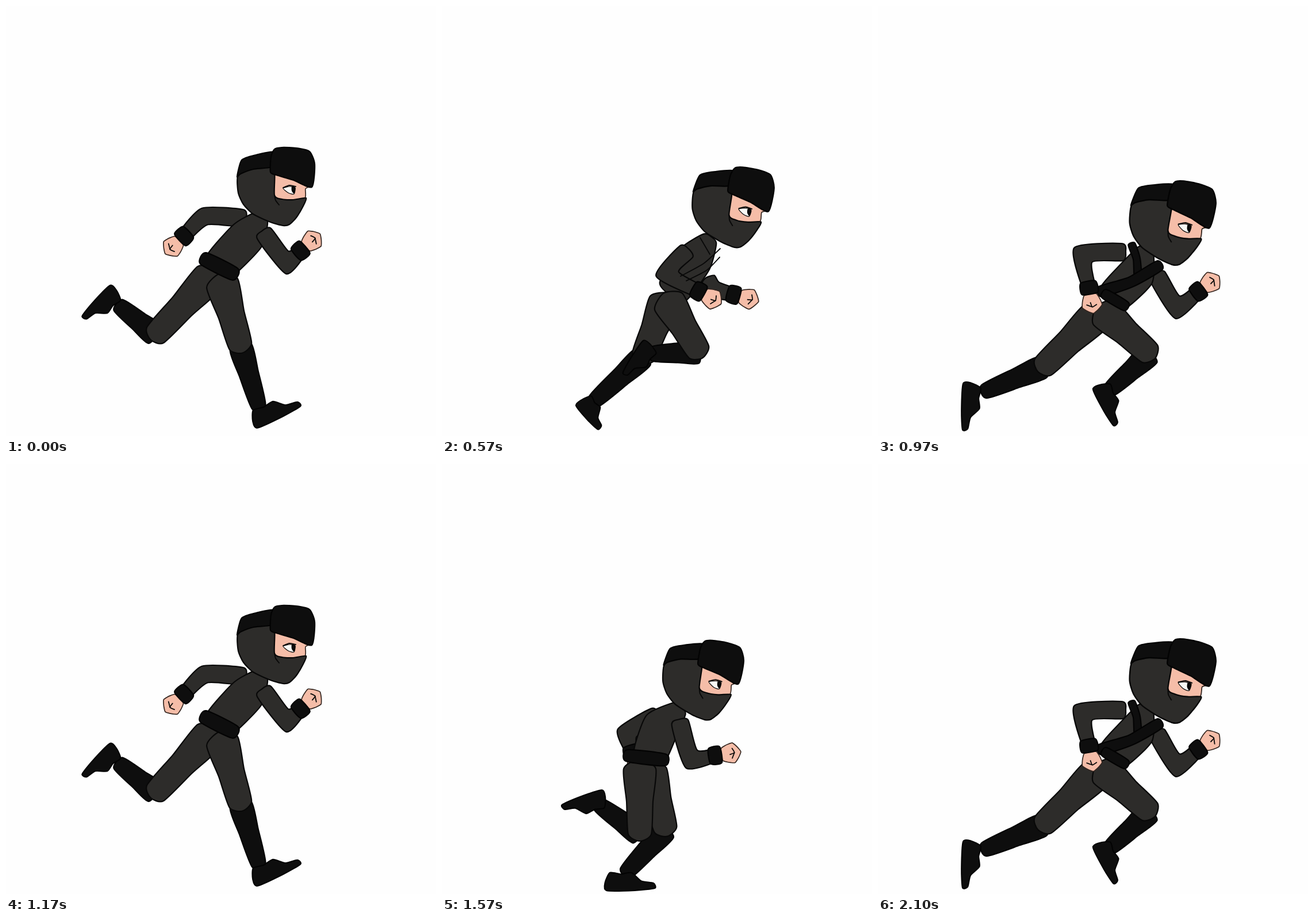
An HTML page that plays this animation: 748x748 px, repeating every 2260 ms.

```html
<!DOCTYPE html>
<html>
<head>
<meta charset="utf-8">
<title>Running ninja</title>
<style>
html, body { margin: 0; height: 100%; overflow: hidden; background: #fefefe; }
svg { display: block; width: 100%; height: 100%; }
path { stroke: #080808; stroke-width: 2.2; stroke-linejoin: round; stroke-linecap: round; }
.suit { fill: #2d2c2a; }
.black { fill: #0e0e0e; stroke: #030303; }
.skin { fill: #f5bda8; stroke: #33251f; stroke-width: 1.7; }
.eye { fill: #fafaf6; stroke-width: 1.2; }
.line { fill: none; stroke-width: 1.8; }
</style>
</head>
<body>
<svg viewBox="0 0 748 748"></svg>
<script>
const { PI, cos, sin, max, atan2, hypot } = Math;
const angle = (a, b) => atan2(b[1] - a[1], b[0] - a[0]);
const step = ([x, y], a, d) => [x + d * cos(a), y + d * sin(a)];
const mix = (a, b, t) => a.map((v, i) => v + (b[i] - v) * t);

// Softly rounded curve through points.
function shape(name, p) {
  const n = p.length, open = name == 'line';
  const at = i => p[open ? max(0, Math.min(n - 1, i)) : (i + n) % n];
  let d = 'M' + p[0];
  for (let i = 0; i < n - open; i++) {
    const [a, b, c, e] = [at(i - 1), at(i), at(i + 1), at(i + 2)];
    const c1 = b.map((v, k) => v + (c[k] - a[k]) / 9);
    const c2 = c.map((v, k) => v - (e[k] - b[k]) / 9);
    d += `C${c1} ${c2} ${c}`;
  }
  return `<path class="${name}" d="${d}${open ? '' : 'Z'}"/>`;
}
const draw = (name, text) => shape(name, text.split(' ').map(s => s.split(',').map(Number)));

// Tube along joints with a half-width at each; cap rounds both ends.
function limb(name, joints, widths, cap = 0) {
  const last = joints.length - 1;
  const dirs = joints.slice(1).map((p, i) => angle(joints[i], p));
  const side = s => joints.map((p, i) => {
    const a = dirs[max(0, i - 1)], b = dirs[Math.min(i, last - 1)];
    const half = atan2(sin(b - a), cos(b - a)) / 2;
    const w = widths[i] ?? widths[0];
    return step(p, a + half + s * PI / 2, w / max(.7, cos(half)));
  });
  const tip = step(joints[last], dirs[last - 1], cap * (widths[last] ?? widths[0]));
  const tail = step(joints[0], dirs[0], -cap * widths[0]);
  return shape(name, [...side(-1), ...(cap ? [tip] : []), ...side(1).reverse(), ...(cap ? [tail] : [])]);
}

const group = (x, y, turn, scale, art) =>
  `<g transform="translate(${x} ${y}) rotate(${turn}) scale(${scale})">${art}</g>`;

const knuckles = Array.from({ length: 15 }, (_, i) => {
  const a = i / 15 * 2 * PI;
  return step([0, 0], a, 17 + 1.3 * cos(5 * a));
});
const handArt = shape('skin', knuckles) + draw('line', '4,-8 7,0 -1,2') + draw('line', '7,0 2,9');
const shoeArt = draw('black', '0,0 -2,-14 7,-31 26,-28 45,-30 62,-15 83,-11 85,-2 50,1');
const headArt =
  draw('skin', '-1,-12 33,0 63,12 54,18 52,35 13,38 0,31') +
  draw('suit', '-64,-3 -63,25 -54,45 -37,62 -7,76 15,82 26,80 38,68 50,48 55,34 33,37 13,36 0,29 -2,-22 -47,-20') +
  draw('line', '0,29 2,38 8,46') +
  draw('black', '-65,-3 -57,-32 -32,-41 -1,-46 -2,-21 -37,-16 -59,-8') +
  draw('black', '0,-51 13,-54 38,-53 61,-47 70,-25 65,15 33,3 3,-6 -7,-11 -6,-38') +
  draw('eye', '15,17 27,14 36,16 34,27 24,25') +
  draw('black', '31,15 35,16 34,25 31,21') +
  draw('line', '15,16 26,12 37,14');

const sleeve = joints => limb('suit', joints, [15, 14, 11], .4);
function fist([, elbow, wrist]) {
  const a = angle(elbow, wrist);
  const [x, y] = step(wrist, a, 27);
  return group(x, y, a * 180 / PI, 1, handArt) +
    limb('black', [step(wrist, a, -10), step(wrist, a, 10)], [13, 14]);
}
function leg([hip, knee, ankle, heel, toe]) {
  const size = hypot(toe[0] - heel[0], toe[1] - heel[1]) / 85;
  return limb('black', [knee, mix(knee, ankle, .45), ankle], [19, 17, 12]) +
    group(...heel, angle(heel, toe) * 180 / PI, `${size} 1`, shoeArt) +
    limb('suit', [hip, mix(hip, knee, .5), knee], [28, 23, 20], .6);
}
const band = (width, ...joints) => limb('black', joints, [width]);

const pose = ({ head: [x, y, turn, scale], torso, farArm, nearArm, farLeg, nearLeg, trim }) => [
  sleeve(farArm), fist(farArm), leg(farLeg),
  limb('suit', torso, [14, 31, 28], .3),
  leg(nearLeg), sleeve(nearArm), trim, fist(nearArm),
  group(x, y, turn, scale, headArt)
].join('');

const stride = pose({
  head: [467, 300, 0, 1],
  torso: [[444, 368], [420, 400], [370, 453]],
  farArm: [[412, 369], [346, 366], [310, 400]],
  nearArm: [[449, 396], [489, 446], [512, 426]],
  farLeg: [[354, 472], [260, 572], [195, 520], [181, 486], [131, 538]],
  nearLeg: [[376, 482], [408, 592], [440, 698], [437, 734], [513, 698]],
  trim: band(11, [343, 439], [399, 467])
});

const landing = pose({
  head: [459, 342, 4, 1],
  torso: [[432, 398], [410, 430], [365, 475]],
  farArm: [[395, 405], [332, 425], [314, 453]],
  nearArm: [[440, 425], [470, 482], [512, 466]],
  farLeg: [[345, 492], [305, 605], [242, 570], [229, 533], [192, 574]],
  nearLeg: [[368, 495], [407, 618], [392, 710], [372, 743], [452, 741]],
  trim: band(11, [334, 468], [395, 490])
});

const crouch = pose({
  head: [451, 360, 6.6, 1.02],
  torso: [[414, 425], [382, 455], [360, 510]],
  farArm: [[372, 438], [322, 468], [331, 500]],
  nearArm: [[414, 450], [434, 513], [475, 507]],
  farLeg: [[363, 535], [389, 636], [319, 712], [286, 742], [370, 740]],
  nearLeg: [[344, 530], [344, 644], [272, 592], [278, 567], [208, 591]],
  trim: band(10, [321, 507], [389, 515])
});

const push = pose({
  head: [503, 334, 7, 1.03],
  torso: [[466, 405], [440, 440], [402, 496]],
  farArm: [[462, 478], [474, 493], [507, 502]],
  nearArm: [[425, 427], [392, 466], [446, 496]],
  farLeg: [[388, 515], [350, 610], [264, 688], [233, 695], [270, 738]],
  nearLeg: [[394, 514], [447, 602], [364, 605], [350, 582], [313, 637]],
  trim: draw('line', '449,403 466,432') + draw('line', '484,422 455,448 415,470') +
    draw('line', '483,437 460,460 425,478')
});

const leap = pose({
  head: [522, 295, 0, 1.02],
  torso: [[503, 368], [480, 412], [425, 470]],
  farArm: [[517, 398], [533, 464], [579, 455]],
  nearArm: [[478, 376], [400, 389], [414, 439]],
  farLeg: [[395, 496], [294, 586], [214, 676], [186, 670], [205, 740]],
  nearLeg: [[408, 482], [503, 565], [427, 632], [398, 626], [432, 695]],
  trim: band(6, [495, 362], [503, 382], [497, 402]) +
    band(8, [516, 380], [500, 412], [470, 436], [428, 442])
});

const reach = pose({
  head: [509, 360, 8.5, 1.08],
  torso: [[466, 424], [450, 465], [408, 508]],
  farArm: [[486, 470], [521, 524], [557, 497]],
  nearArm: [[425, 428], [357, 433], [367, 490]],
  farLeg: [[378, 540], [287, 628], [184, 671], [148, 657], [145, 737]],
  nearLeg: [[393, 533], [473, 605], [403, 668], [374, 667], [408, 731]],
  trim: band(6, [441, 414], [450, 440], [452, 472]) +
    band(9, [490, 451], [440, 480], [386, 497]) + band(8, [393, 500], [432, 523])
});

const poses = [stride, landing, crouch, push, leap, reach];
const ends = [200, 400, 570, 770, 970, 1170, 1370, 1570, 1730, 1900, 2100, 2260];
const svg = document.querySelector('svg');
svg.innerHTML = poses.map(p => `<g>${p}</g>`).join('');
const groups = [...svg.children];
const start = performance.now();

function tick() {
  const t = (performance.now() - start) % 2260;
  const now = ends.findIndex(e => t < e) % poses.length;
  groups.forEach((g, i) => g.style.display = i == now ? '' : 'none');
  requestAnimationFrame(tick);
}
tick();
</script>
</body>
</html>
```
